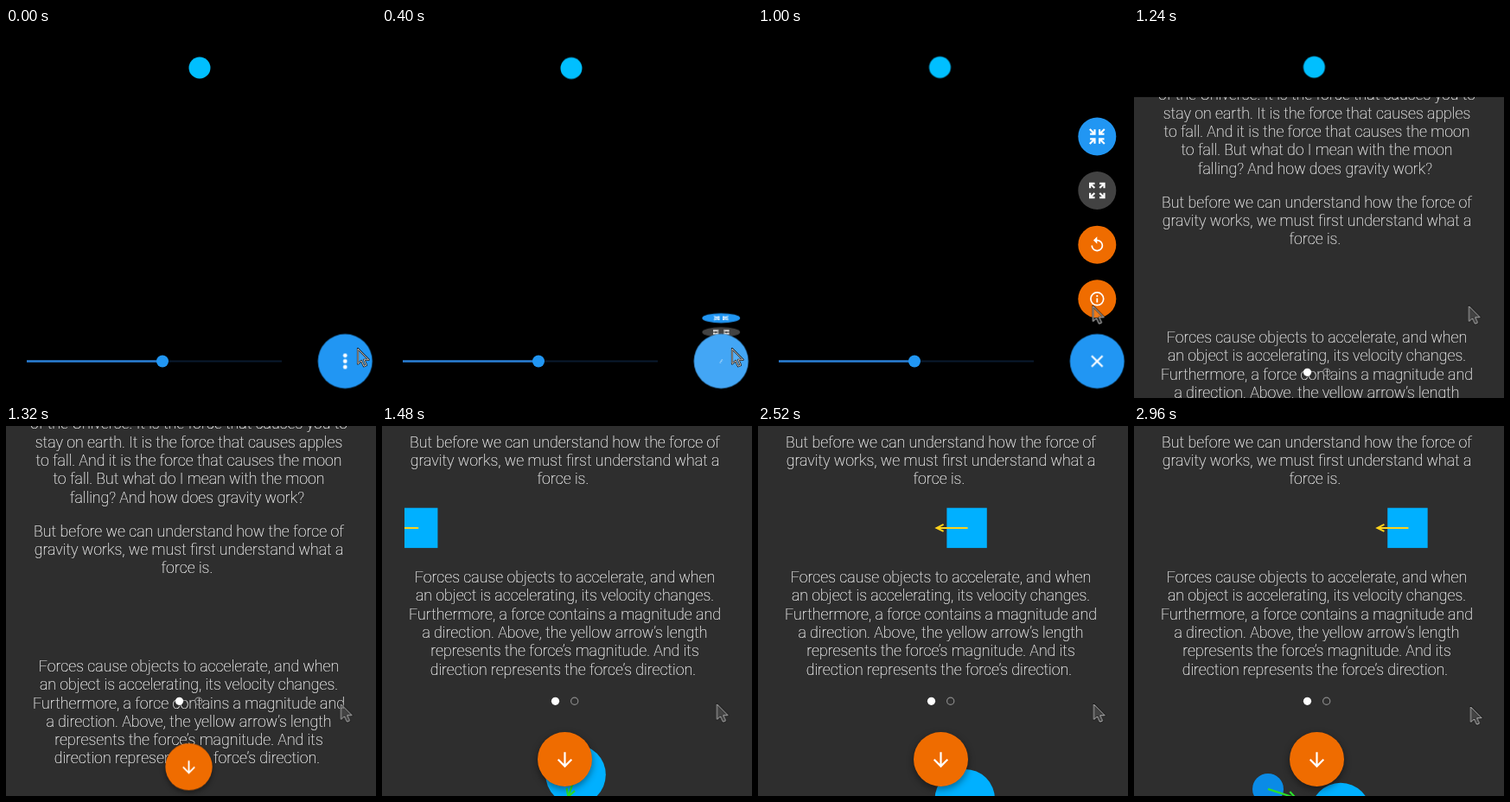
These frames come from a looping animation (428x428 px, 3 s). An HTML page:

```html
<!DOCTYPE html>
<html lang="en">
<head>
<meta charset="utf-8">
<title>Gravity demo</title>
<style>
  html, body { margin: 0; width: 100%; height: 100%; overflow: hidden; background: #000; }
  svg { display: block; width: 100vw; height: 100vh; }
  .anim { animation: 3s linear infinite; }
  .line { fill: none; stroke: #fff; stroke-width: 2.2; }
  .white { fill: #fff; }
  text { font: 100 17.8px Roboto, sans-serif; fill: #fff; stroke: #fff; stroke-width: .2px; text-anchor: middle; }
  .shadow { filter: drop-shadow(0 3px 4px rgba(0, 0, 0, .45)); }

  .planet { animation-name: planet; }
  @keyframes planet {
    0% { transform: translate(224px, 46px); }
    13.333% { transform: translate(219px, 46.5px); }
    33.333% { transform: translate(210.5px, 45.5px); }
    38%, 100% { transform: translate(208.4px, 45.2px); }
  }

  .dial { transform-origin: 0 409px; animation-name: dial; }
  @keyframes dial {
    0%, 11.57% { transform: scaleY(0); animation-timing-function: ease; }
    21.333%, 100% { transform: scaleY(1); }
  }
  .ripple { animation-name: ripple; }
  @keyframes ripple {
    0%, 9% { opacity: 0; }
    12%, 18% { opacity: .16; }
    25%, 100% { opacity: 0; }
  }
  .more { animation-name: more; }
  @keyframes more {
    0%, 8% { transform: none; }
    15.2%, 100% { transform: rotate(45deg) scale(0); }
  }
  .close { animation-name: close; }
  @keyframes close {
    0%, 15.2% { transform: rotate(-45deg) scale(0); animation-timing-function: cubic-bezier(.25, .8, .25, 1); }
    23%, 100% { transform: none; }
  }

  .page { animation-name: page; }
  @keyframes page {
    0%, 37.333% { transform: translateY(440px); animation-timing-function: ease-out; }
    43.667%, 100% { transform: none; }
  }
  .scroll { animation-name: scroll; }
  @keyframes scroll {
    0%, 44% { transform: translateY(103px); animation-timing-function: ease-in-out; }
    48.667%, 100% { transform: none; }
  }
  .demo { animation-name: demo; animation-timing-function: step-end; }
  @keyframes demo {
    0% { opacity: 0; }
    46.667%, 100% { opacity: 1; }
  }
  .next { transform-origin: 211.5px 449px; animation-name: next; }
  @keyframes next {
    0%, 40% { transform: scale(0); }
    44% { transform: scale(.86); animation-timing-function: ease-out; }
    47.333%, 100% { transform: none; }
  }

  .cursor { animation-name: cursor; }
  @keyframes cursor {
    0% { transform: translate(407px, 371px); }
    13.333% { transform: translate(405px, 371px); animation-timing-function: ease-in-out; }
    32%, 60% { transform: translate(387.5px, 321.8px); }
    62%, 94% { transform: translate(388.5px, 322px); }
    98.5%, 100% { transform: translate(389.5px, 325px); }
  }
</style>
</head>
<body>
<svg viewBox="0 0 428 428">
  <defs>
    <clipPath id="lane"><rect x="26" y="85" width="376" height="66"/></clipPath>
    <clipPath id="sheet"><rect width="428" height="440"/></clipPath>
    <path id="out" d="M3 -3L8 -8M2.8 -8.2H8.2V-2.8"/>
    <path id="in" d="M8.5 -8.5L3 -3M2.8 -8.2V-2.8H8.2"/>
    <path id="pointer" d="M0 0V17.5L4 14L7 20.3L10 19L7.2 12.8H12.6Z"/>
  </defs>
  <rect width="428" height="428"/>

  <circle class="anim planet" r="12.5" fill="#00bfff"/>
  <path d="M181 385.5H319" stroke="#0a1a2e" stroke-width="2.2"/>
  <path d="M24 385.5H181" stroke="#2a80d8" stroke-width="2.4"/>
  <circle cx="181" cy="385.5" r="7" fill="#2196f3"/>

  <g class="anim dial">
    <g transform="translate(392.3 125.5)">
      <circle r="22" fill="#2196f3"/><g class="line" data-icon="in"></g>
    </g>
    <g transform="translate(392.3 188)">
      <circle r="22" fill="#424242"/><g class="line" data-icon="out"></g>
    </g>
    <g transform="translate(392.3 250.7)">
      <circle r="22" fill="#ef6c00"/>
      <path class="white" transform="scale(.86) translate(-12 -12)" d="M12 5V1L7 6l5 5V7c3.31 0 6 2.69 6 6s-2.69 6-6 6-6-2.69-6-6H4c0 4.42 3.58 8 8 8s8-3.58 8-8-3.58-8-8-8z"/>
    </g>
    <g transform="translate(392.3 313.3)">
      <circle r="22" fill="#ef6c00"/>
      <circle class="line" r="7.4" style="stroke-width:1.7"/>
      <path class="line" d="M0 -4.2V-2.4M0 -.9V4.2" style="stroke-width:1.8"/>
    </g>
  </g>

  <g transform="translate(392.3 385.5)">
    <circle r="31.5" fill="#2196f3"/>
    <circle class="anim ripple white" r="31.5"/>
    <g class="anim more white"><circle cy="-6.7" r="2.4"/><circle r="2.4"/><circle cy="6.7" r="2.4"/></g>
    <path class="anim close line" d="M-6.3 -6.3L6.3 6.3M6.3 -6.3L-6.3 6.3"/>
  </g>

  <g class="anim page" clip-path="url(#sheet)">
    <rect width="428" height="440" fill="#2e2e2e"/>
    <g class="anim scroll">
      <g id="copy"></g>
      <g class="anim demo">
        <g clip-path="url(#lane)">
          <g id="box">
            <rect x="-23.2" y="-23.2" width="46.4" height="46.4" fill="#00b0ff"/>
            <path d="M1 0H-35M-27 -4L-35 0L-27 4" fill="none" stroke="#ffd21c" stroke-width="2"/>
          </g>
        </g>
        <circle id="big" r="34.8" fill="#00b0ff"/>
        <circle id="small" r="18" fill="#0a8be6"/>
        <g fill="none" stroke="#2be02b" stroke-width="2.2">
          <path id="bigPull"/><path id="smallPull"/>
        </g>
      </g>
    </g>
    <circle class="white" cx="200.5" cy="318.3" r="4.6"/>
    <circle cx="222.7" cy="318.3" r="4.1" fill="none" stroke="#8a8a8a" stroke-width="1.2"/>
    <g class="anim next">
      <circle class="shadow" cx="211.5" cy="385.5" r="31.5" fill="#ef6c00"/>
      <path class="line" d="M211.5 377.2V393.2M203.7 385.8L211.5 393.6L219.3 385.8"/>
    </g>
  </g>

  <g class="anim cursor" stroke-linejoin="round">
    <use href="#pointer" fill="none" stroke="#111" stroke-width="2.2"/>
    <use href="#pointer" fill="#fff" fill-opacity=".1" stroke="#c8c8c8" stroke-width="1"/>
  </g>
</svg>
<script>
const $ = id => document.getElementById(id);
const LOOP = 3000;

for (const icon of document.querySelectorAll('[data-icon]')) {
  icon.innerHTML = [0, 90, 180, 270]
    .map(a => `<use href="#${icon.dataset.icon}" transform="rotate(${a})"/>`).join('');
}

// Each paragraph: first baseline, then its lines; the last ends in a hard space.
const paragraphs = [
  [-99.6, 'of the Universe. It is the force that causes you to', 'stay on earth. It is the force that causes apples',
    'to fall. And it is the force that causes the moon', 'to fall. But what do I mean with the moon',
    'falling? And how does gravity work?\u00a0'],
  [24.6, 'But before we can understand how the force of', 'gravity works, we must first understand what a', 'force is.\u00a0'],
  [181, 'Forces cause objects to accelerate, and when', 'an object is accelerating, its velocity changes.',
    'Furthermore, a force contains a magnitude and', 'a direction. Above, the yellow arrow’s length',
    'represents the force’s magnitude. And its', 'direction represents the force’s direction.\u00a0']
];
$('copy').innerHTML = paragraphs.map(([y, ...lines]) =>
  lines.map((s, i) => `<text x="211.5" y="${y + i * 21.3}">${s}</text>`).join('')).join('');

// Parabola through values at 1.48 s, 2.04 s and 2.96 s.
function curve(t, a, b, c) {
  const s1 = (b - a) / .56, s2 = (c - b) / .92;
  return a + s1 * (t - 1.48) + (s2 - s1) / 1.48 * (t - 1.48) * (t - 2.04);
}

function place(el, [x, y]) {
  el.setAttribute('transform', `translate(${x} ${y})`);
}

function pull(el, from, to, len) {
  const angle = Math.atan2(to[1] - from[1], to[0] - from[0]) * 180 / Math.PI;
  el.setAttribute('d', `M0 0H${len}M${len - 9} -5L${len} 0L${len - 9} 5`);
  el.setAttribute('transform', `translate(${from}) rotate(${angle})`);
}

function draw(t) {
  const big = [curve(t, 224, 235, 239), curve(t, 403.3, 417, 447.5)];
  const small = [curve(t, 196, 168, 155), curve(t, 487, 474, 420)];
  const len = Math.min(34, 27 + (t - 1.48) * 12);
  place($('box'), [curve(t, 41, 153, 316.3), 117.9]);
  place($('big'), big);
  place($('small'), small);
  pull($('bigPull'), big, small, len);
  pull($('smallPull'), small, big, len);
}

let start;
function tick() {
  const now = performance.now();
  start ??= now;
  draw((now - start) % LOOP / 1000);
  requestAnimationFrame(tick);
}
tick();
</script>
</body>
</html>
```
